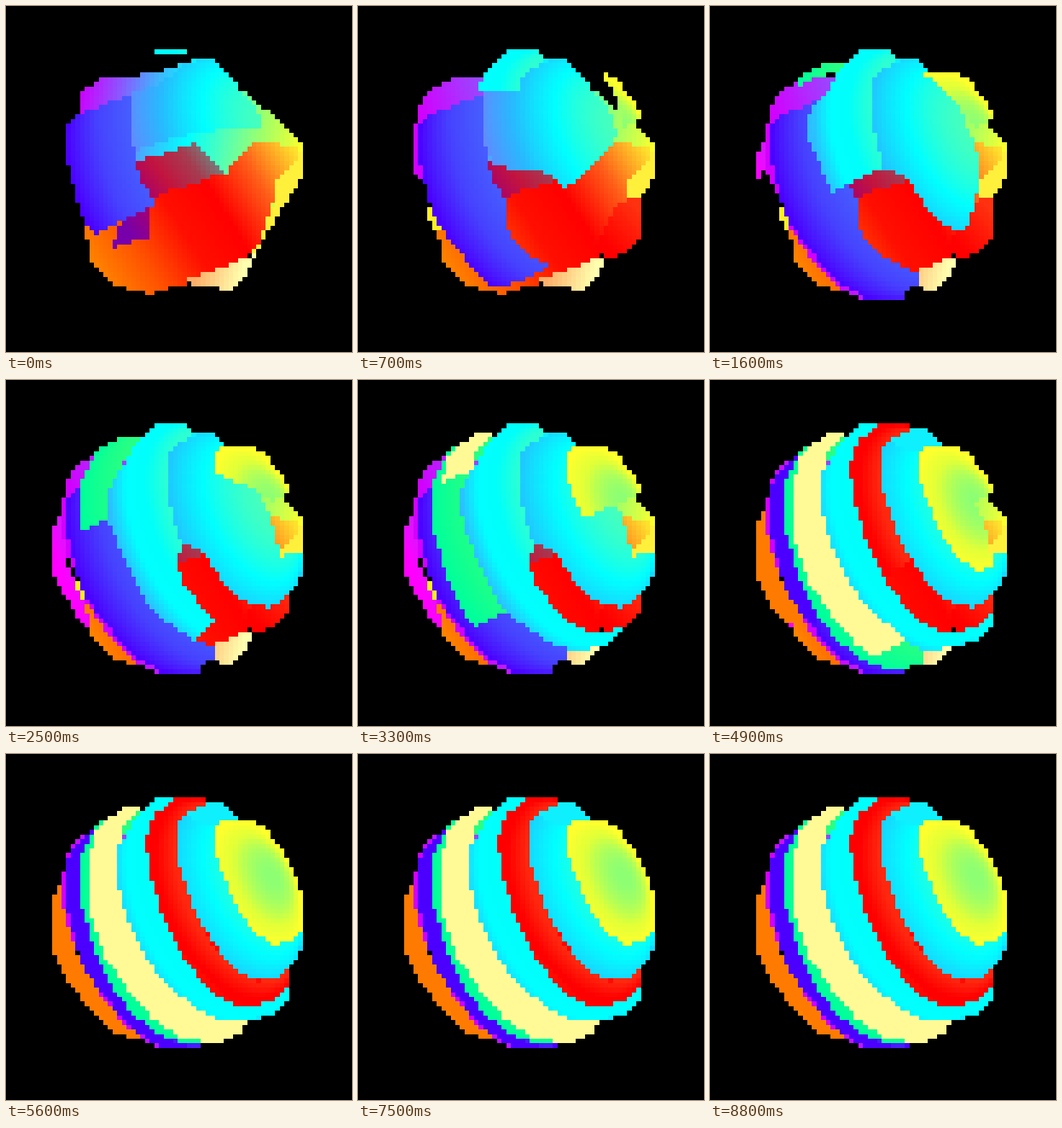
An HTML page with a canvas that plays this animation: 480x480 px, repeating every 8900 ms.

```html
<!DOCTYPE html>
<html>
<head>
<meta charset="utf-8">
<title>Ribbon ball</title>
<style>
html, body { margin: 0; width: 100%; height: 100%; overflow: hidden; background: #000; }
canvas { display: block; width: 480px; height: 480px; }
</style>
</head>
<body>
<canvas id="stage" width="480" height="480"></canvas>
<script>
const ctx = document.getElementById('stage').getContext('2d');
const LOOP = 8900, STEP = 100;
const CELL = 6.44, LEFT = 64.1, TOP = 60.1, COUNT = 54;
const CX = 238, CY = 234, R = 174;

const clamp01 = v => Math.max(0, Math.min(1, v));
const lerp = (a, b, k) => a + (b - a) * k;

function ramp(colors, k) {
  const pos = clamp01(k) * (colors.length - 1);
  const i = Math.min(Math.floor(pos), colors.length - 2);
  return 'rgb(' + colors[i].map((v, n) => Math.round(lerp(v, colors[i + 1][n], pos - i))) + ')';
}

// Paints: one colour, a straight gradient, or a gradient along the ball's axis.
const flat = (r, g, b) => () => `rgb(${r},${g},${b})`;
const linear = (x0, y0, x1, y1, ...colors) => {
  const dx = x1 - x0, dy = y1 - y0, len2 = dx * dx + dy * dy;
  return c => ramp(colors, ((c.x - x0) * dx + (c.y - y0) * dy) / len2);
};
const axial = (from, to, ...colors) => c => ramp(colors, (c.lat - from) / (to - from));

// keys: step, leading angle, step, leading angle...
const layers = [];
const ribbon = (points, paint, ...keys) =>
  layers.push({ path: new Path2D('M' + points + 'Z'), paint, keys });

// inside of the shell
ribbon('83,165 103,150 103,118 135,100 180,97 212,92 264,73 283,73 303,95 322,113 380,160 412,190 412,230 345,345 200,250 90,200',
  linear(100, 140, 410, 195, [205, 0, 255], [140, 85, 255], [60, 185, 255], [0, 255, 255], [85, 255, 180], [165, 255, 100], [250, 255, 45]));
ribbon('264,190 305,232 345,185 412,200 412,235 372,250 372,270 348,340 270,378 200,401 150,387 116,355 110,308 200,250',
  linear(130, 370, 400, 200, [255, 130, 0], [255, 80, 0], [255, 15, 0], [255, 0, 0], [255, 95, 25], [255, 225, 45]));
ribbon('412,200 412,235 380,285 348,340 335,370 341,345 355,320 372,270 372,248', flat(255, 240, 60));
ribbon('251,380 345,345 341,360 328,380 312,394 264,388',
  linear(265, 370, 325, 385, [255, 175, 105], [255, 255, 175]));
ribbon('360,275 393,262 393,322 370,345 345,350 330,330',
  linear(345, 330, 393, 285, [255, 0, 0], [255, 50, 15]), 4, 0);
ribbon('174,218 264,190 305,232 290,235 250,250 215,260 200,275 200,320 148,336 160,300 167,275',
  linear(170, 310, 305, 215, [120, 0, 170], [165, 0, 110], [195, 20, 62], [165, 60, 80], [100, 150, 140]));

// outer ribbons
ribbon('93,275 104,280 113,310 103,308', flat(255, 240, 40), 3, 0);
ribbon('77,170 90,130 110,110 135,98 174,98 174,122 103,150 90,170 103,280 148,350 180,385 219,402 213,408 200,402 180,390 148,362 110,305 97,265 77,230',
  linear(85, 140, 175, 110, [210, 0, 255], [150, 75, 255]), 1, -100, 7, -22, 16, 45);
ribbon('64,208 77,185 83,250 97,285 113,325 116,350 97,325 77,290 64,270',
  linear(70, 250, 105, 235, [255, 0, 255], [200, 30, 255]), 10, -70, 16, -32, 25, 25);
ribbon('64,200 77,175 77,205 90,255 110,300 135,340 165,375 195,398 180,396 150,383 110,345 90,322 64,272',
  flat(255, 122, 0), 40, -75, 42, -60, 55, 80);
ribbon('83,165 103,150 174,122 200,119 200,130 187,180 180,218 190,245 206,270 206,310 225,335 250,355 290,370 290,388 270,395 270,408 213,408 206,400 180,385 150,352 122,320 103,285 90,235 83,205',
  axial(-.35, .4, [75, 0, 255], [70, 65, 255], [70, 100, 255]), 0, 8, 7, 47, 16, 100);
ribbon('84,150 97,125 122,105 103,150 110,215 125,270 150,315 200,375 240,402 270,408 219,408 180,385 140,340 103,275 90,230 84,190',
  flat(75, 0, 255), 42, -80, 55, 100);
ribbon('270,401 277,401 277,408 270,408', flat(75, 0, 255), 75, 0);
ribbon('174,122 212,108 250,80 270,73 290,73 303,92 325,115 345,140 365,185 375,220 380,245 412,240 412,270 393,298 365,316 340,310 315,298 290,265 268,232 206,224 187,218 174,190',
  axial(.3, 1.05, [100, 135, 255], [40, 185, 255], [0, 255, 255], [90, 255, 170]), 0, -20, 25, 118);
ribbon('290,100 303,92 345,92 361,105 385,135 400,165 412,195 412,240 393,262 370,264 345,248 320,215 300,165 290,135',
  axial(.85, 1, [255, 255, 45], [225, 255, 55], [140, 255, 115]), 2, -150, 7, -125, 16, -85, 25, -50, 42, 48, 56, 135);
ribbon('161,122 180,90 206,65 212,60 245,60 264,73 245,85 228,100 222,140 232,195 245,228 238,250 245,280 264,305 290,335 325,350 365,345 390,322 390,340 370,360 340,370 300,375 270,365 235,345 200,318 165,250 148,210 135,185 135,155 148,130',
  axial(.14, .6, [45, 190, 255], [0, 255, 255], [0, 255, 250], [45, 255, 210]), 0, -92, 40, 130);
ribbon('103,145 116,115 130,95 160,79 187,79 165,110 145,145 141,180 152,215 165,250 200,318 240,350 295,375 296,393 264,401 235,398 206,385 175,360 145,320 122,270 106,215',
  axial(-.15, .25, [0, 255, 155], [40, 255, 130]), 13, -85, 16, -68, 25, -28, 42, 78);
ribbon('116,150 122,110 148,85 167,73 187,73 165,95 155,130 155,180 167,225 190,275 220,318 260,350 300,370 335,372 322,390 290,402 240,393 206,370 175,335 150,300 135,280 116,215',
  flat(255, 250, 150), 27, -86, 42, 2, 56, 95);
ribbon('206,85 219,73 232,60 270,60 290,70 309,92 283,76 250,82 238,95 238,145 251,190 270,235 290,270 315,298 350,316 375,310 393,298 393,322 370,342 340,350 310,340 270,305 240,268 215,220 200,165 193,120',
  axial(.4, .65, [255, 0, 0], [255, 0, 0], [255, 40, 15]), 36, -110, 42, -62, 55, 80);
ribbon('250,84 270,73 283,67 300,67 328,92 300,92 288,100 270,95', flat(15, 240, 255), 48, 0);

function leadingAngle(keys, step) {
  if (!keys.length) return Infinity;
  if (step < keys[0]) return -Infinity;
  for (let i = 2; i < keys.length; i += 2) {
    if (step < keys[i]) {
      return lerp(keys[i - 1], keys[i + 1], (step - keys[i - 2]) / (keys[i] - keys[i - 2]));
    }
  }
  return Infinity;
}

// Each cell knows its place on a tilted ball.
const cells = [];
for (let j = 0; j < COUNT; j++) {
  for (let i = 0; i < COUNT; i++) {
    const x = LEFT + (i + .5) * CELL, y = TOP + (j + .5) * CELL;
    const u = (x - CX) / R, v = (y - CY) / R;
    const w = Math.sqrt(Math.max(0, 1 - u * u - v * v));
    const angle = Math.atan2(.443 * u + .898 * v, -.494 * u + .244 * v + .835 * w) * 180 / Math.PI;
    const left = Math.round(LEFT + i * CELL), top = Math.round(TOP + j * CELL);
    const cell = {
      x, y, angle, lat: .75 * u - .37 * v + .55 * w, left, top,
      width: Math.round(LEFT + (i + 1) * CELL) - left,
      height: Math.round(TOP + (j + 1) * CELL) - top
    };
    cell.stack = layers.filter(l => ctx.isPointInPath(l.path, x, y))
      .map(layer => ({ layer, color: layer.paint(cell) })).reverse();
    cells.push(cell);
  }
}

function draw(step) {
  ctx.fillStyle = '#000';
  ctx.fillRect(0, 0, 480, 480);
  for (const layer of layers) layer.lead = leadingAngle(layer.keys, step);
  for (const cell of cells) {
    const hit = cell.stack.find(s => cell.angle < s.layer.lead);
    if (!hit) continue;
    ctx.fillStyle = hit.color;
    ctx.fillRect(cell.left, cell.top, cell.width, cell.height);
  }
}

let shown = -1;
const start = performance.now();
function tick() {
  const step = Math.floor(((performance.now() - start) % LOOP) / STEP);
  if (step !== shown) draw(shown = step);
  requestAnimationFrame(tick);
}
tick();
</script>
</body>
</html>
```
